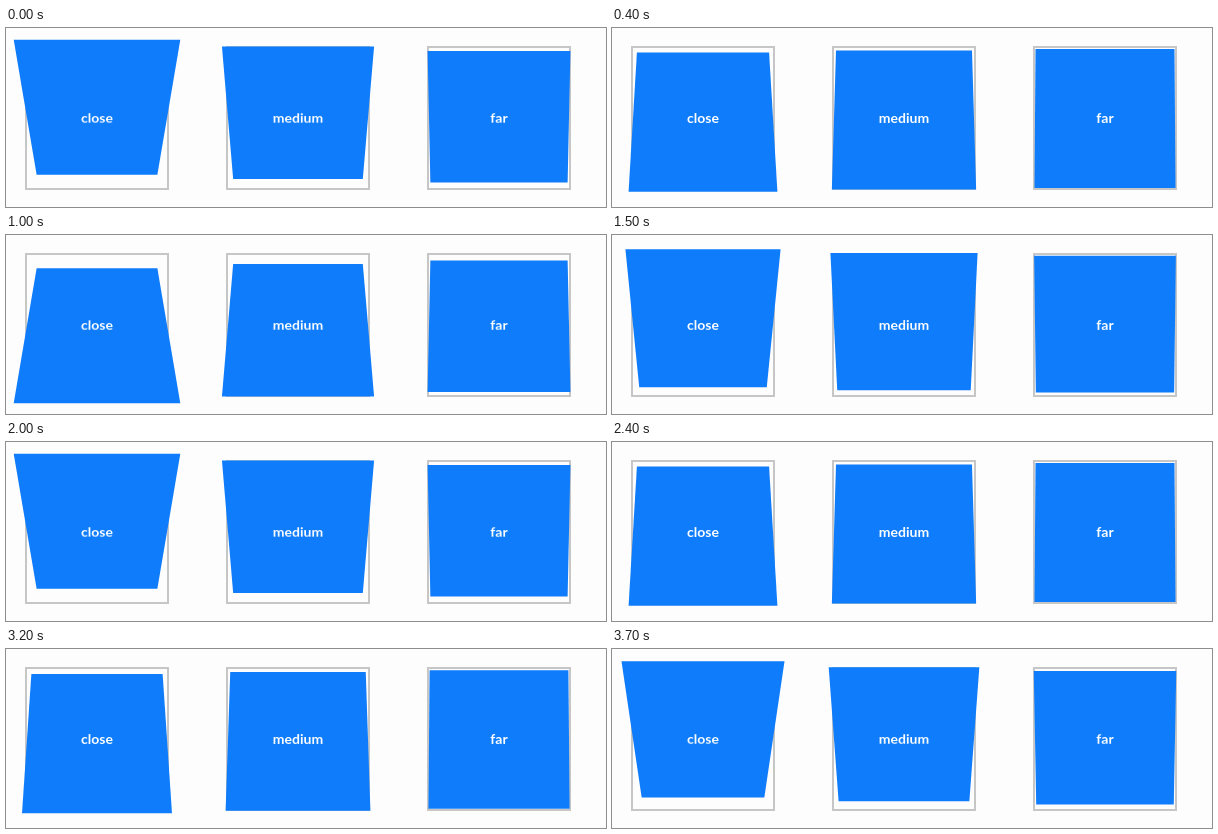
An HTML page for the animation above (3.8 s loop, 600 px wide and 179 px high).

```html
<!DOCTYPE html>
<html lang="en">
<head>
<meta charset="utf-8">
<title>Perspective depth</title>
<style>
  html, body {
    margin: 0;
    width: 100%;
    height: 100%;
    overflow: hidden;
    background: #fefdfe;
  }
  .frame {
    position: absolute;
    top: 18px;
    width: 140px;
    height: 140px;
    border: 2px solid #c6c6c6;
  }
  .close { left: 19px; perspective: 150px; }
  .medium { left: 219.8px; perspective: 300px; }
  .far { left: 420.6px; perspective: 1200px; }
  .face {
    height: 140px;
    background: #0e7cfb;
    color: #fff;
    font: bold 14px/140px Lato, sans-serif;
    text-align: center;
    animation: rock 2s infinite paused;
  }
  @keyframes rock {
    0%, 100% { transform: rotateX(-20deg); }
    50% { transform: rotateX(20deg); }
    0%, 50% { animation-timing-function: cubic-bezier(.4, .1, .28, 1); }
  }
</style>
</head>
<body>
<div class="frame close"><div class="face">close</div></div>
<div class="frame medium"><div class="face">medium</div></div>
<div class="frame far"><div class="face">far</div></div>
<script>
  // The loop cuts off shortly before the second swing ends, in 100 ms steps.
  const LOOP = 3800, STEP = 100;
  const swings = document.getAnimations();
  const start = performance.now();

  function draw(now) {
    const t = Math.max(0, now - start) % LOOP;
    const time = Math.floor(t / STEP) * STEP;
    for (const swing of swings) swing.currentTime = time;
    requestAnimationFrame(draw);
  }
  draw(start);
</script>
</body>
</html>
```
